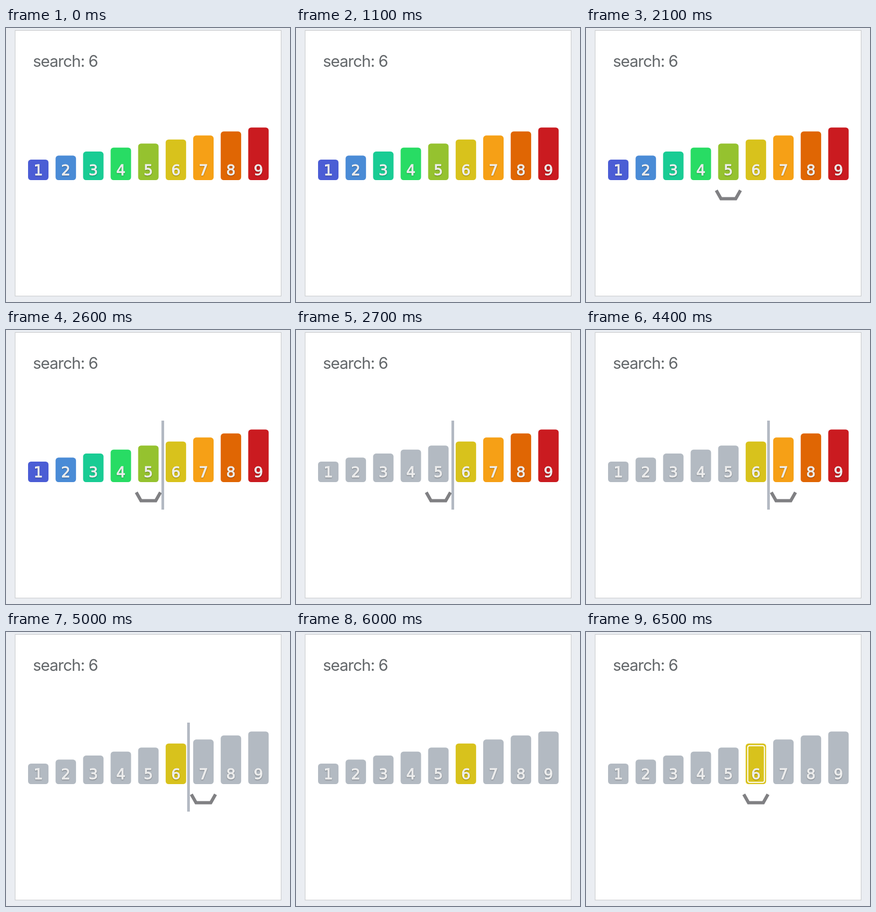
An HTML page that plays this animation: 528 px wide and 508 px high, repeating every 7.7 s.

```html
<!DOCTYPE html>
<html lang="en">
<head>
<meta charset="utf-8">
<title>Binary search</title>
<style>
  html, body { margin: 0; width: 100%; height: 100%; overflow: hidden; background: #eaedf2; }
  svg { display: block; }
  .query { font: 400 29.5px Inter, Roboto, sans-serif; letter-spacing: -1px; fill: #63676a; }
  .digit {
    font: 400 27px "DejaVu Sans", sans-serif;
    fill: #fff; stroke: #fff; stroke-width: .9;
    text-anchor: middle;
    text-shadow: 0 1px 2px rgba(0, 0, 0, .3);
  }
</style>
</head>
<body>
<svg id="stage" width="528" height="508" viewBox="0 0 528 508">
  <rect x="17" y="4.5" width="494.5" height="492.5" fill="#fff" stroke="#c6c7c9"/>
  <text class="query" x="50" y="72">search: 6</text>
  <g id="bars"></g>
  <rect id="ring" x="300.7" y="210.7" width="31" height="68" rx="3.5" fill="none" stroke="#fff" stroke-width="2"/>
  <path id="bracket" d="M-22.5 301L-13.7 316.5H13.7L22.5 301" fill="none" stroke="#808083" stroke-width="6"/>
  <rect id="divider" y="168" width="5" height="165" fill="#b3b9c3"/>
</svg>
<script>
const LOOP = 7700;
const GRAY = '#b3bac2';
const COLORS = ['#4b5dd5', '#4a8bd6', '#19cc94', '#28dc64', '#95c22f',
                '#d8c21c', '#f6a016', '#e06603', '#ca1b20'];
const BASE = 282, BAR_WIDTH = 38, STEP = 51.17;
const byId = id => document.getElementById(id);
const barLeft = n => 41 + (n - 1) * STEP;
const barCenter = n => barLeft(n) + BAR_WIDTH / 2;

function add(parent, tag, attrs) {
  const node = document.createElementNS('http://www.w3.org/2000/svg', tag);
  for (const key in attrs) node.setAttribute(key, attrs[key]);
  return parent.appendChild(node);
}

const bars = COLORS.map((color, i) => {
  const n = i + 1, height = 38 + 7.45 * i;
  const bar = add(byId('bars'), 'rect', {
    x: barLeft(n), y: BASE - height, width: BAR_WIDTH, height, rx: 5.5
  });
  add(byId('bars'), 'text', { class: 'digit', x: barCenter(n), y: 273 }).textContent = n;
  return bar;
});

// Each step lists only what changes; low..high are the remaining candidates.
const steps = [
  { at: 0, probe: 0, cut: 0, low: 1, high: 9, found: false },
  { at: 1600, probe: 5 },
  { at: 2200, cut: 291.5 },
  { at: 2700, low: 6 },
  { at: 3300, probe: 0, cut: 0 },
  { at: 3800, probe: 7 },
  { at: 4400, cut: 339.3 },
  { at: 5000, high: 6 },
  { at: 5600, probe: 0, cut: 0 },
  { at: 6100, probe: 6 },
  { at: 6500, found: true }
];

function show(node, visible) {
  node.setAttribute('visibility', visible ? 'visible' : 'hidden');
}

function render(time) {
  const state = Object.assign({}, ...steps.filter(step => step.at <= time));
  bars.forEach((bar, i) => {
    const active = i + 1 >= state.low && i + 1 <= state.high;
    bar.setAttribute('fill', active ? COLORS[i] : GRAY);
  });
  show(byId('ring'), state.found);
  show(byId('bracket'), state.probe);
  show(byId('divider'), state.cut);
  if (state.probe) byId('bracket').setAttribute('transform', `translate(${barCenter(state.probe)} 0)`);
  if (state.cut) byId('divider').setAttribute('x', state.cut - 2.5);
}

const start = performance.now();
function tick() {
  render((performance.now() - start) % LOOP);
  requestAnimationFrame(tick);
}
tick();
</script>
</body>
</html>
```
